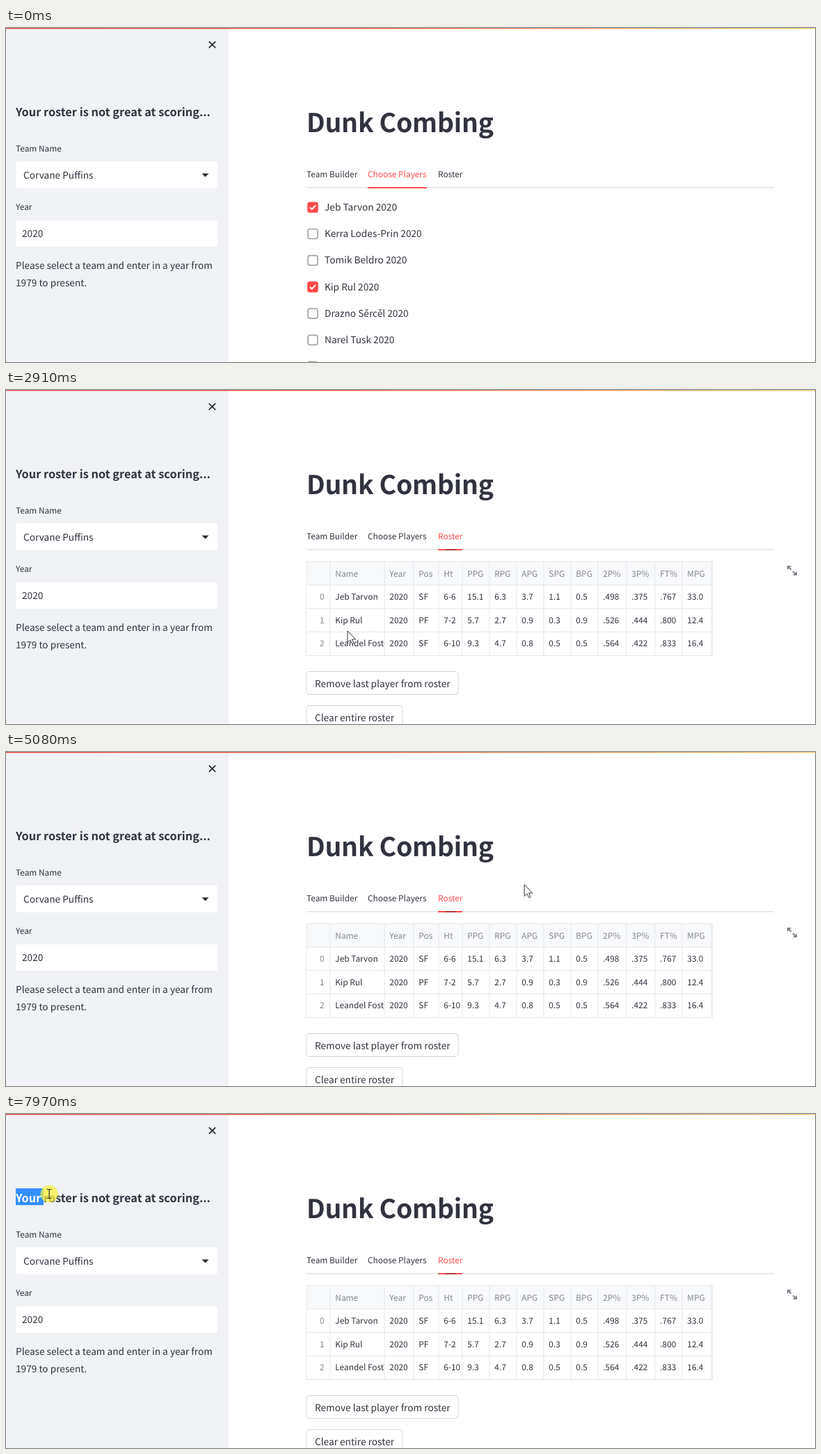
Recreate the animation shown at these times as an HTML page. Size 1163 px wide and 481 px high, loop 8000 ms.

```html
<!DOCTYPE html>
<html lang="en">
<head>
<meta charset="utf-8">
<title>Roster builder</title>
<style>
  html, body { margin: 0; width: 100%; height: 100%; overflow: hidden; background: #fff; }
  svg { display: block; width: 100%; height: 100%; }
  text { font-family: "Noto Sans CJK JP", "Noto Sans CJK SC", "Noto Sans", sans-serif;
         fill: #31333f; white-space: pre; text-rendering: geometricPrecision; }
  text.red { fill: #ff4b4b; }
  text.dim { fill: #83868f; }
  text.bold { font-weight: 700; }
</style>
</head>
<body>
<svg id="stage" viewBox="0 0 1163 481" xmlns="http://www.w3.org/2000/svg"></svg>
<script>
const LOOP = 8000, STEP = 70, OFFSET = 30;
const SWITCH = 2350;            // roster tab opens
const BODY = 13.68, SMALL = 11.9;

const text = (x, y, size, str, attrs = '') =>
  `<text x="${x}" y="${y}" font-size="${size}" ${attrs}>${str}</text>`;
const rect = (x, y, w, h, attrs = '') =>
  `<rect x="${x}" y="${y}" width="${w}" height="${h}" ${attrs}/>`;
const line = (x1, y1, x2, y2) => `M${x1} ${y1}L${x2} ${y2}`;

const heading = (attrs = '') =>
  text(14, 126.5, 16.3, 'Your roster is not great at scoring...',
    'class="bold" letter-spacing=".03" ' + attrs);

function sidebar() {
  return rect(0, 0, 320, 481, 'fill="#f0f2f6"') +
    `<path d="M291.8 19.3l9.4 9.4m0-9.4l-9.4 9.4" stroke="#262730" stroke-width="1.7"/>` +
    heading() +
    text(14, 177.5, SMALL, 'Team Name') +
    rect(14, 192, 290, 39, 'rx="4" fill="#fff"') +
    text(25, 217, BODY, 'Corvane Puffins') +
    `<path d="M281.5 209.5h10l-5 5z" fill="#262730"/>` +
    text(14, 262, SMALL, 'Year') +
    rect(14, 277, 290, 38, 'rx="4" fill="#fff"') +
    text(23, 301, BODY, '2020') +
    text(14, 347, BODY, 'Please select a team and enter in a year from') +
    text(14, 372, BODY, '1979 to present.');
}

function header() {
  return rect(0, 0, 1163, 1.3, 'fill="url(#bar)"') +
    text(432, 150, 37.4, 'Dunk Combing', 'class="bold" letter-spacing="-.2"') +
    rect(432, 229.2, 672, 1.3, 'fill="#dfe0e4"') +
    text(432, 214.5, SMALL, 'Team Builder') +
    text(520, 214.5, SMALL, 'Choose Players', 'id="tabChoose"') +
    text(621, 214.5, SMALL, 'Roster', 'id="tabRoster"');
}

function players() {
  const names = ['Jeb Tarvon', 'Kerra Lodes-Prin', 'Tomik Beldro', 'Kip Rul',
                 'Drazno Sěrcěl', 'Narel Tusk', ''];
  const picked = ['Jeb Tarvon', 'Kip Rul'];
  const rows = names.map((name, i) => {
    const y = 258 + i * 38.2;
    const box = picked.includes(name)
      ? rect(433.2, y - 7.5, 15.6, 15.6, 'rx="3.5" fill="#ff4b4b"') +
        `<path d="M437 ${y + .4}l2.7 2.7 5.4-5.6" fill="none" stroke="#fff" stroke-width="1.9"/>`
      : rect(434, y - 6.7, 14, 14, 'rx="3" fill="#fff" stroke="#a3a4ab" stroke-width="1.7"');
    return box + (name && text(458, y + 5, BODY, name + ' 2020'));
  });
  return rect(520, 229, 85, 2, 'fill="#ff4b4b"') + rows.join('');
}

function roster() {
  const edges = [466, 544, 586, 622, 656, 695, 734, 773, 812, 851, 892, 933, 972, 1014];
  const table = [
    ' |Name|Year|Pos|Ht|PPG|RPG|APG|SPG|BPG|2P%|3P%|FT%|MPG',
    '0|Jeb Tarvon|2020|SF|6-6|15.1|6.3|3.7|1.1|0.5|.498|.375|.767|33.0',
    '1|Kip Rul|2020|PF|7-2|5.7|2.7|0.9|0.3|0.9|.526|.444|.800|12.4',
    '2|Leandel Fost|2020|SF|6-10|9.3|4.7|0.8|0.5|0.5|.564|.422|.833|16.4'
  ];
  const cells = table.map((row, r) => row.split('|').map((cell, c) =>
    text(c ? edges[c - 1] + 7.3 : 451, 268.8 + r * 33.5, SMALL, cell,
      (r && c ? '' : 'class="dim"') + (c === 1 ? ' clip-path="url(#nameCol)"' : ''))
  ).join('')).join('');
  const grid = edges.map(x => line(x, 247, x, 382)).join('') +
    [281, 314.7, 348.3].map(y => line(432, y, 1015, y)).join('');
  const button = (y, w, label) =>
    rect(432, y, w, 33, 'rx="4" fill="#fff" stroke="#d6d7da"') + text(444, y + 22.5, BODY, label);
  return rect(621, 229, 35, 2, 'fill="#ff4b4b"') +
    rect(632, 229.4, 15, 1.4, 'fill="#8a3a3c"') +
    rect(432, 247, 583, 34, 'fill="#f8f9fb"') +
    `<path d="${grid}" stroke="#e6e7ea" fill="none"/>` +
    rect(432, 247, 583.5, 135.5, 'fill="none" stroke="#e6e7ea"') + cells +
    button(405.5, 218, 'Remove last player from roster') +
    button(454.5, 138, 'Clear entire roster') +
    `<g fill="#80838c" stroke="#80838c" stroke-width="2">
      <path stroke="none" d="M1123 253h6l-6 6zM1137 267h-6l6-6z"/>
      <path d="M1125 255l3.8 3.8M1135 265l-3.8-3.8"/></g>`;
}

const pointers = `
  <circle id="halo" r="12.5" fill="#f8f03c" opacity=".75"/>
  <path id="arrow" d="M0 0V16.6L3.9 13 6.6 18.6 9 17.5 6.4 12H11.6Z"
    fill="#fff" stroke="#333" stroke-linejoin="round"/>
  <path id="hand" transform="translate(.5 .7)" d="M-1.6 1.2Q-1.5 -.3 0 -.3T1.6 1.2V6.2Q4.2 5.4 4.6 7 7 6.4 7.2 8 9.6 7.6 9.6 9.6V13.6Q9 16 8 18.6H-.2Q-2 14.8-4.8 11.4-5.2 9.4-3.4 9.4L-1.6 11Z M1.6 6.2V9.5M4.6 7V9.8M7.2 8V10.2"
    fill="#fff" stroke="#333" stroke-linejoin="round"/>
  <path id="beam" d="M-3.5 -6.5H-1L0 -5.8 1 -6.5H3.5M0 -5.8V5.8M-3.5 6.5H-1L0 5.8 1 6.5H3.5"
    fill="none" stroke="#333" stroke-width="1.2"/>`;

const stage = document.getElementById('stage');
stage.innerHTML = `
  <defs>
    <linearGradient id="bar"><stop stop-color="#e2453c"/><stop offset=".42" stop-color="#e8573f"/>
      <stop offset="1" stop-color="#f2cb68"/></linearGradient>
    <clipPath id="nameCol">${rect(467, 247, 76.3, 136)}</clipPath>
    <clipPath id="selClip">${rect(14, 107, 0, 24.5, 'id="selBox"')}</clipPath>
  </defs>
  ${rect(0, 0, 1163, 481, 'fill="#fff"')}${sidebar()}${header()}
  <g id="players">${players()}</g><g id="roster">${roster()}</g>
  <g clip-path="url(#selClip)">
    ${rect(14, 107, 60, 24.5, 'fill="#338fff"')}${heading('style="fill:#fff"')}</g>
  <g id="pointer">${pointers}</g>`;

const el = id => document.getElementById(id);
const show = (id, on) => el(id).setAttribute('visibility', on ? 'visible' : 'hidden');

// pointer path: time, x, y
const path = [
  [520, 829, 428], [590, 787, 412], [870, 787, 412], [1400, 664, 282], [1570, 664, 282],
  [2060, 637, 217], [2350, 637, 217], [2620, 556, 262], [2900, 491, 347], [3200, 640, 392],
  [3500, 850, 310], [3760, 740, 200], [4000, 570, 268], [4230, 495, 359], [4500, 640, 450],
  [4770, 860, 340], [5080, 740, 190], [5350, 570, 290], [5590, 670, 395], [5840, 817, 424],
  [5960, 790, 436], [6240, 480, 250], [6530, 172, 98], [6900, 60, 108], [7210, 4, 113],
  [7430, 4, 113], [7520, 8, 113], [7720, 8, 115], [7960, 63, 115]
];

function slope(i, k) {
  const a = path[i - 1], b = path[i], c = path[i + 1];
  const still = (p, q) => p[1] === q[1] && p[2] === q[2];
  if (!a || !c || still(a, b) || still(b, c)) return 0;
  return (c[k] - a[k]) / (c[0] - a[0]);
}

function position(t) {
  const n = path.findIndex(p => p[0] > t);
  if (n < 1) return (n ? path[path.length - 1] : path[0]).slice(1);
  const a = path[n - 1], b = path[n], d = b[0] - a[0], u = (t - a[0]) / d;
  const ease = u * u * (3 - 2 * u);
  return [1, 2].map(k => a[k] + (b[k] - a[k]) * ease +
    d * u * (1 - u) * ((1 - u) * slope(n - 1, k) - u * slope(n, k)));
}

function render(t) {
  const q = Math.floor((t - OFFSET) / STEP) * STEP + OFFSET;
  const [x, y] = position(q);
  const open = t >= SWITCH;
  const hover = x > 615 && x < 662 && y < 229 && t < 2550;
  const beam = t >= 7820;
  const press = t >= 2200 && t < 2420 || t >= 7760;

  show('players', !open);
  show('roster', open);
  el('tabChoose').setAttribute('class', open ? '' : 'red');
  el('tabRoster').setAttribute('class', open || hover ? 'red' : '');

  el('pointer').setAttribute('transform', `translate(${x.toFixed(1)} ${y.toFixed(1)})`);
  const seen = t >= 520;
  show('halo', seen && press);
  show('hand', seen && hover);
  show('beam', seen && beam);
  show('arrow', seen && !hover && !beam);

  el('selBox').setAttribute('width', t >= 7960 ? 40 : t >= 7890 ? 22 : 0);
}

const start = performance.now();
function tick() {
  render((performance.now() - start) % LOOP);
  requestAnimationFrame(tick);
}
render(0);
requestAnimationFrame(tick);
</script>
</body>
</html>
```
